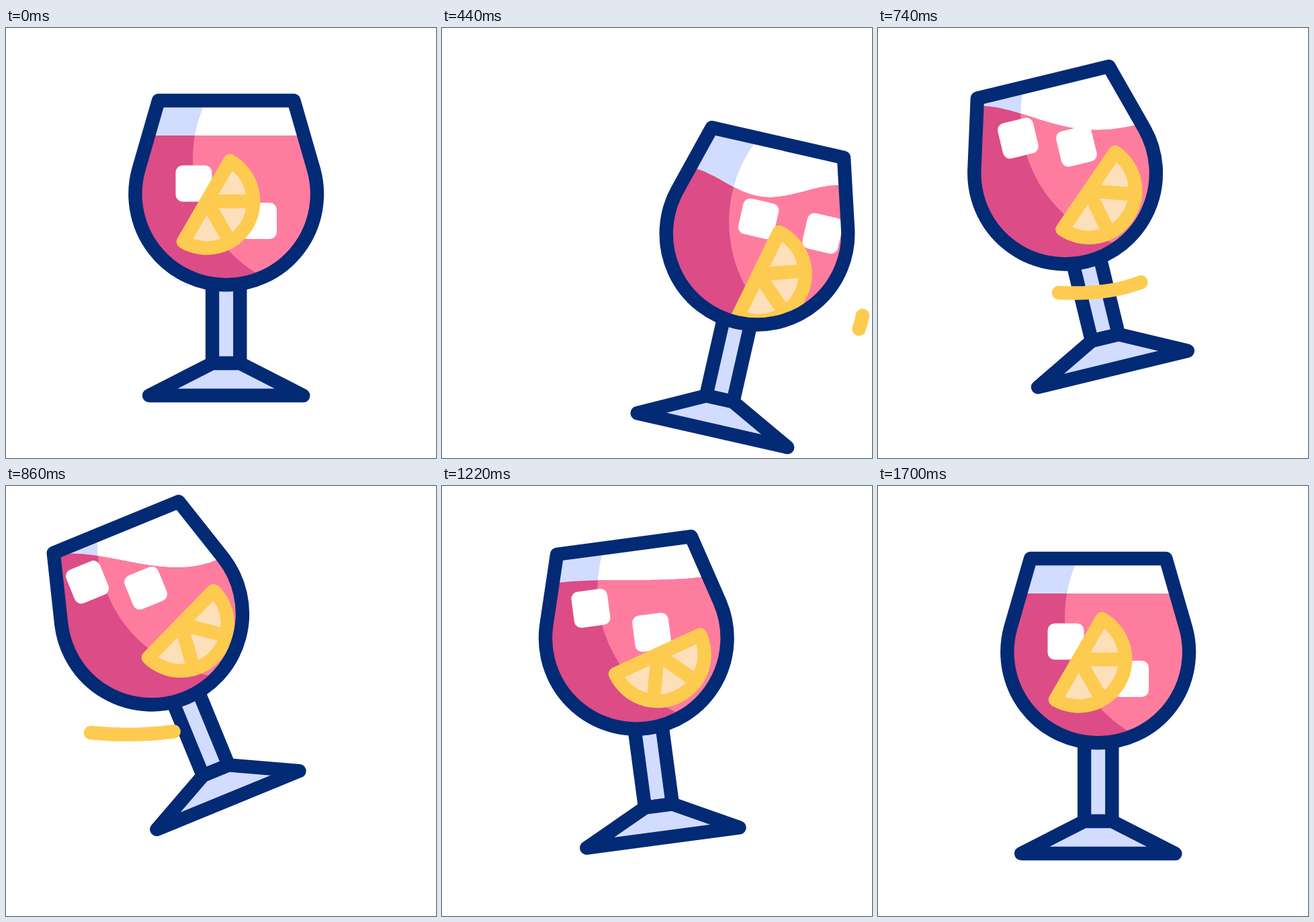
Write an HTML page that moves like this. It is 640 px wide and 640 px high and loops after 2000 ms.

```html
<!DOCTYPE html>
<html lang="en">
<head>
<meta charset="utf-8">
<title>Swirling drink</title>
<style>
  html, body { margin: 0; width: 100%; height: 100%; overflow: hidden; background: #fff; }
  svg { display: block; width: 100vw; height: 100vh; }
  .line { stroke: #032a75; stroke-width: 20.4; stroke-linejoin: round; }
  .fruit { stroke: #fdcb50; stroke-width: 20.4; stroke-linejoin: round; stroke-linecap: round; }
</style>
</head>
<body>
<svg viewBox="0 0 640 640">
  <defs>
    <path id="bowl" d="M-100.7-139H100.7L130.4-36A135.3 135.3 0 1 1-130.4-36Z"/>
    <rect id="cube" x="-27" y="-27" width="54" height="54" rx="10.5" fill="#fff"/>
    <clipPath id="inside"><use href="#bowl"/></clipPath>
    <clipPath id="lit"><circle cx="150.3" cy="-52" r="200"/></clipPath>
  </defs>
  <!-- Everything is drawn around the centre of the bowl. -->
  <g id="glass">
    <path class="line" fill="#d2dcfe" d="M-20.6 120V252H20.6V120"/>
    <path class="line" fill="#d2dcfe" d="M-20.6 252H20.6L114.6 300H-114.6Z"/>
    <g clip-path="url(#inside)">
      <rect x="-150" y="-150" width="300" height="300" fill="#d2dcfe"/>
      <circle cx="150.3" cy="-52" r="200" fill="#fff"/>
      <path class="liquid" fill="#dc4c87"/>
      <path class="liquid" fill="#fe7d9f" clip-path="url(#lit)"/>
      <use id="ice1" href="#cube"/>
      <use id="ice2" href="#cube"/>
      <path id="lemon" class="fruit" fill="#fddfba"
        d="M34.75-60.2A69.5 69.5 0 0 1-34.75 60.2ZM0 0H69.5M0 0L34.75 60.2"/>
    </g>
    <use href="#bowl" class="line" fill="none"/>
    <path id="streak" class="fruit" fill="none" pathLength="1"
      d="M180 84C184 150 130 183 50 186S-150 142-228 80"/>
  </g>
</svg>
<script>
const LOOP = 2000, STEP = 20;
const RIGHT = 420, LEFT = 900;   // when the glass is furthest to each side
const $ = id => document.getElementById(id);
const clamp = v => Math.max(0, Math.min(1, v));
const smooth = u => u * u * (3 - 2 * u);

// Starts and ends at rest, easing through [time, value] stops on the way.
function swing(t, rest, end, ...stops) {
  let from = [0, rest];
  for (const to of [...stops, [end, rest]]) {
    if (t < to[0]) return from[1] + (to[1] - from[1]) * smooth((t - from[0]) / (to[0] - from[0]));
    from = to;
  }
  return rest;
}

function place(el, x, y, turn = 0, after = '') {
  el.setAttribute('transform', `translate(${x} ${y}) rotate(${turn}) ${after}`);
}

function moveGlass(t) {
  const go = (right, left) => swing(t, 0, 1420, [RIGHT, right], [LEFT, left]);
  place($('glass'), 320 + go(126.4, -87), 320 + go(56.2, -61.8), go(13, -23), 'translate(7.7 -73)');
}

// The surface is a half sine wave that tilts, plus a hollow in the middle.
function moveLiquid(t) {
  const tilt = swing(t, 0, 1370, [250, -31], [855, 50]);
  const hollow = swing(t, 0, 1000, [320, 34]);
  let d = 'M-150 150';
  for (let x = -130; x <= 130; x += 5) {
    const a = Math.PI * x / 240;
    d += `L${x} ${-87 + tilt * Math.sin(a) + hollow * Math.cos(a) ** 2}`;
  }
  for (const el of document.querySelectorAll('.liquid')) el.setAttribute('d', d + 'L150 150Z');
}

function moveIce(t) {
  const go = (rest, right, left) => swing(t, rest, 1640, [RIGHT, right], [880, left]);
  place($('ice1'), go(-48.2, -2.5, -71), go(-15.5, -21.8, -80));
  place($('ice2'), go(48.3, 95.5, 6), go(40, -22, -38.5));
}

function moveLemon(t) {
  const go = (rest, ...stops) => swing(t, rest, 1700, ...stops);
  place($('lemon'),
    go(-29, [RIGHT, 15.3], [1050, 40]),
    go(11, [RIGHT, 58.5], [820, 31], [1080, 31]),
    go(0, [RIGHT, -17], [1050, 51.5]));
}

function moveStreak(t) {
  const head = clamp((t - 417) / 545), tail = clamp((t - 556) / 543);
  const el = $('streak');
  el.style.display = head > tail ? '' : 'none';
  el.setAttribute('stroke-dasharray', `${head - tail} 2`);
  el.setAttribute('stroke-dashoffset', -tail);
}

function frame() {
  const t = Math.floor(performance.now() % LOOP / STEP) * STEP;
  for (const move of [moveGlass, moveLiquid, moveIce, moveLemon, moveStreak]) move(t);
  requestAnimationFrame(frame);
}
frame();
</script>
</body>
</html>
```
